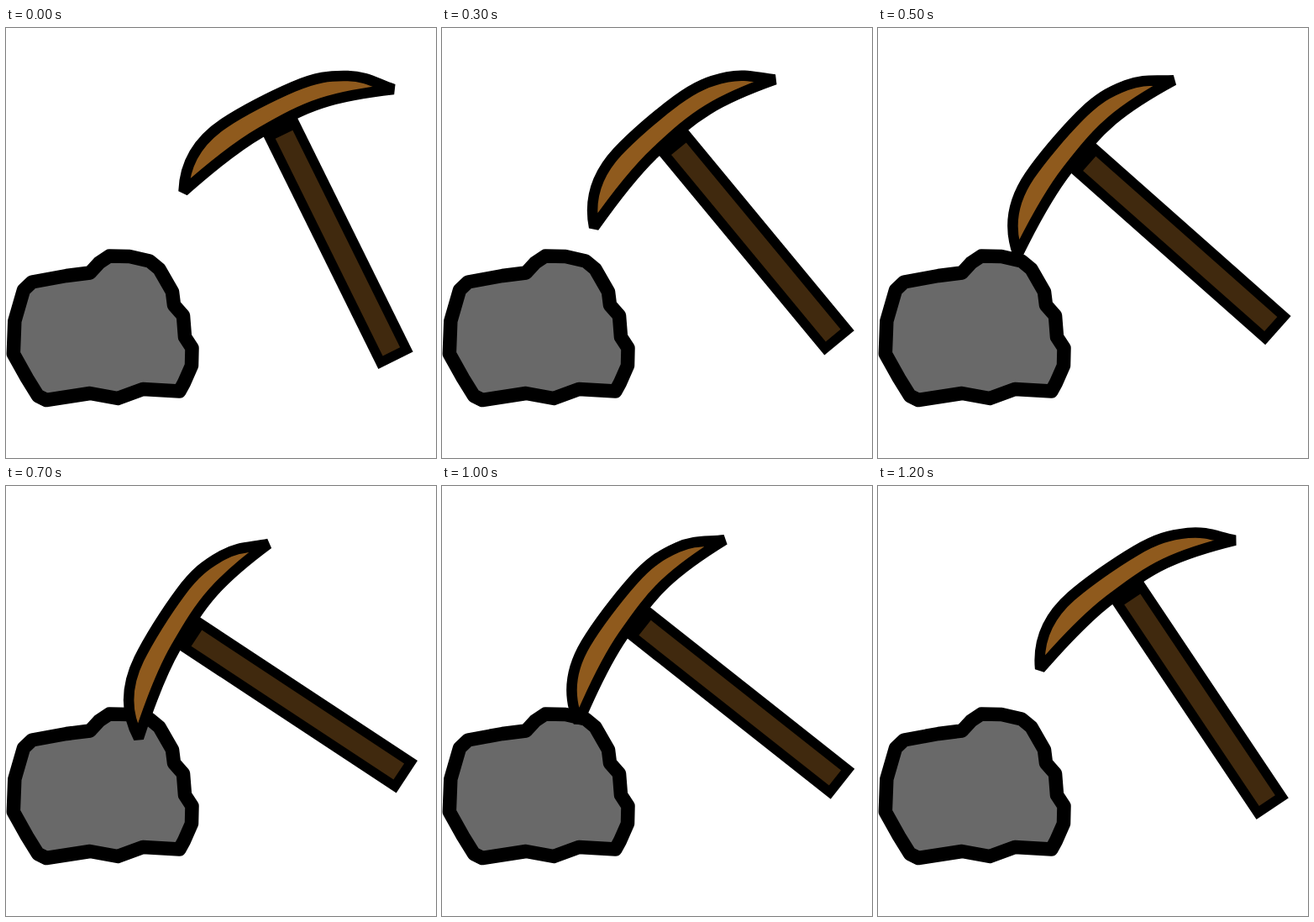
An HTML page for the animation above (1.3 s loop, 512 by 512 pixels).

```html
<!DOCTYPE html>
<html>
<head>
<meta charset="utf-8">
<title>Pickaxe and rock</title>
<style>
  html, body { margin: 0; width: 100%; height: 100%; overflow: hidden; background: #fff; }
  svg { display: block; width: 100vw; height: 100vh; }
</style>
</head>
<body>
<svg viewBox="0 0 512 512">
  <polygon fill="#696969" stroke="#000" stroke-width="16.5" stroke-linejoin="round" points="
    123,271.5 147,272 171,277.5 182.5,287 198,314 200,330 211,342.5 213,368 221.5,381
    221,402 212,422.5 206.5,432.5 163,430 133,441 100,435 48,443 38,438 25,417
    8.8,388 10.3,349 21,312 31,302.5 72,295 100,291.5 111,279.5"/>
  <g id="pick">
    <g transform="translate(464 395.7) rotate(-26.3)">
      <rect x="-23" y="-314" width="46" height="314"/>
      <rect x="-11.5" y="-300" width="23" height="288.5" fill="#40290e"/>
    </g>
    <path fill="#8f5a1d" stroke="#000" stroke-width="12.5" stroke-linejoin="bevel" d="M211.5 194.5
      C213 152 238.5 127.5 259.5 113.5S315 81.5 342 70S385 56.5 407 57S440 65.5 461.5 73
      C425 77 400 81.5 375.5 89.5S331 108.5 304 124S251 159.5 211.5 194.5Z"/>
  </g>
</svg>
<script>
  const pick = document.getElementById('pick');
  const STEP = 100;
  // Swing in degrees for each step: slow strike, quick lift.
  const swing = [0, 4.4, 8.9, 13.3, 17.8, 22.2, 26.4, 30.3, 34.8, 39.4, 25.4, 16.5, 7.5];

  function draw() {
    const step = Math.floor(performance.now() / STEP) % swing.length;
    pick.setAttribute('transform', `rotate(${-swing[step]} 379.5 346.3)`);
    requestAnimationFrame(draw);
  }
  draw();
</script>
</body>
</html>
```
